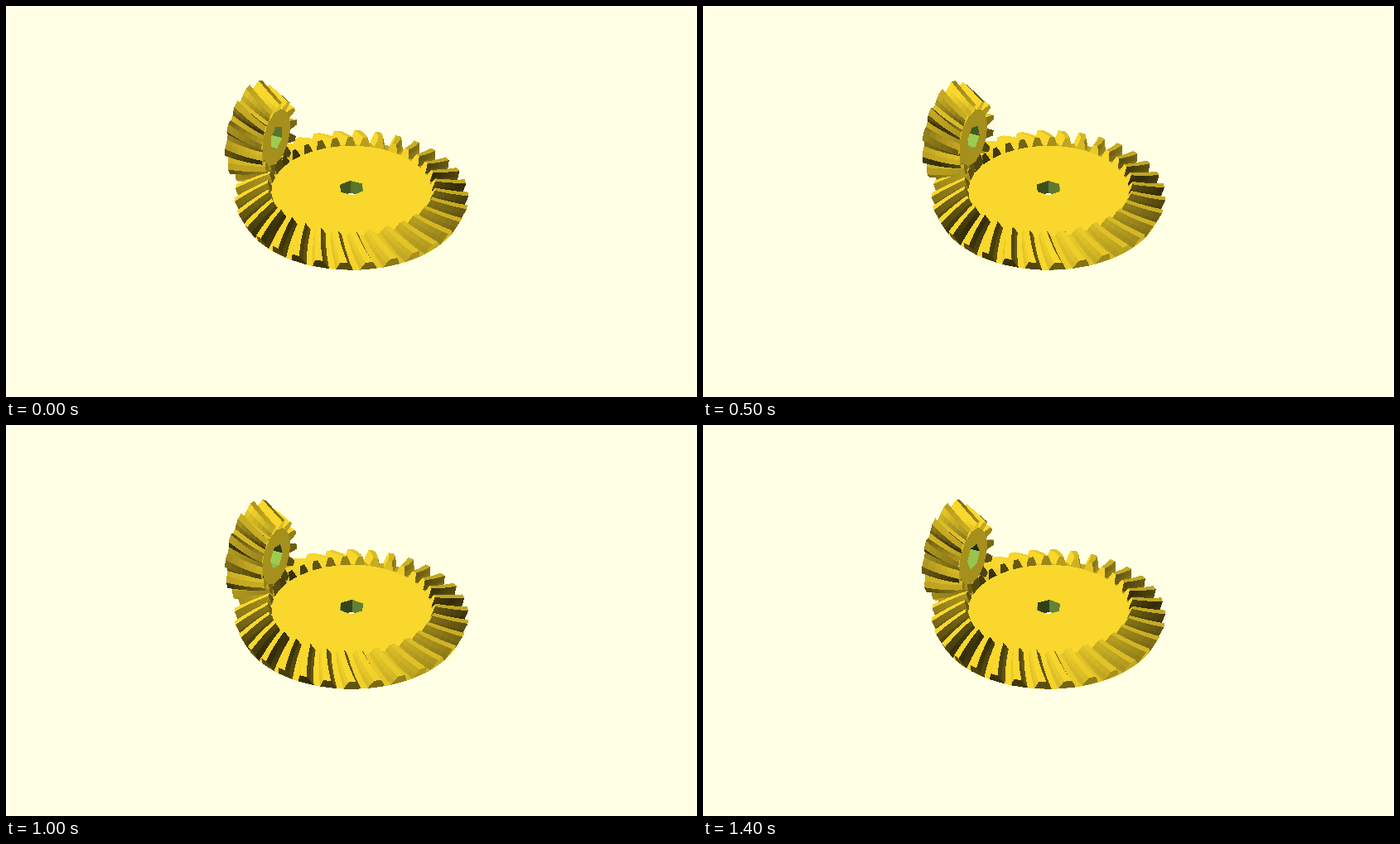
An HTML page with a canvas that plays this animation: 834x472 px, repeating every 1.5 s.

```html
<!DOCTYPE html>
<html lang="en">
<head>
<meta charset="utf-8">
<title>Bevel gears</title>
<style>
  html, body { margin: 0; width: 834px; height: 472px; overflow: hidden; background: #ffffe5; }
  canvas { display: block; }
</style>
</head>
<body>
<canvas id="stage" width="834" height="472"></canvas>
<script>
const W = 834, H = 472, LOOP = 1500, STEP = 100;
const ctx = document.getElementById('stage').getContext('2d');
const image = ctx.createImageData(W, H);
const pixels = new Uint32Array(image.data.buffer);
const zbuf = new Float32Array(W * H);

const RAD = Math.PI / 180, TAU = 2 * Math.PI;
const YELLOW = [249, 215, 44], GREEN = [157, 203, 81];
const BACKGROUND = 0xffe5ffff;

// Camera: 35 degrees above the ground, looking at the stage centre.
const CAM = H / 2 / Math.tan(11.25 * RAD);
const SIN = Math.sin(35 * RAD), COS = Math.cos(35 * RAD);

// Gear pair sharing one cone apex.
const PITCH_RADIUS = 136.6, ADDENDUM = 8, DEDENDUM = 7.5;
const INNER = 0.714, TWIST = 0.62, SLICES = 6, BORE = 15.5;
const APEX = [0, 0, 64.5];
const AZIMUTH = 25 * RAD;
const WHEEL = {
  teeth: 32, phase: 3.3 / 11.25, bore: -5 * RAD,
  axis: [0, 0, -1], u: [0, 1, 0], v: [1, 0, 0]
};
const PINION = {
  teeth: 13, phase: 2 * 13 / 360, bore: 0,
  axis: [-Math.cos(AZIMUTH), Math.sin(AZIMUTH), 0],
  u: [0, 0, 1], v: [-Math.sin(AZIMUTH), -Math.cos(AZIMUTH), 0]
};
WHEEL.cone = Math.atan2(WHEEL.teeth, PINION.teeth);
PINION.cone = Math.PI / 2 - WHEEL.cone;
const CONE_LENGTH = PITCH_RADIUS / Math.sin(WHEEL.cone);

// One tooth across: [offset in pitches, height from the pitch cone].
const PROFILE = [
  [-0.36, -DEDENDUM], [-0.265, 0.3], [-0.15, ADDENDUM],
  [0.15, ADDENDUM], [0.265, 0.3], [0.36, -DEDENDUM], [0.64, -DEDENDUM]
];

const sub = (a, b) => [a[0] - b[0], a[1] - b[1], a[2] - b[2]];
const dot = (a, b) => a[0] * b[0] + a[1] * b[1] + a[2] * b[2];
const cross = (a, b) => [
  a[1] * b[2] - a[2] * b[1], a[2] * b[0] - a[0] * b[2], a[0] * b[1] - a[1] * b[0]
];

const toEye = ([x, y, z]) => [x, y * SIN + z * COS, z * SIN - y * COS];

function project(p) {
  const k = CAM / (CAM - p[2]);
  return [W / 2 + p[0] * k, H / 2 - p[1] * k, k];
}

function shade(normal, color) {
  const [x, y, z] = normal, len = Math.hypot(x, y, z) * Math.sqrt(3);
  const light = (-x + y + z) / len;
  const k = Math.min(1, 0.2 + Math.abs(Math.max(0, light)) + Math.max(0, -light));
  const [r, g, b] = color.map(c => Math.round(c * k));
  return (255 << 24 | b << 16 | g << 8 | r) >>> 0;
}

function triangle(a, b, c, color) {
  const area = (b[0] - a[0]) * (c[1] - a[1]) - (b[1] - a[1]) * (c[0] - a[0]);
  if (Math.abs(area) < 1e-6) return;
  const x0 = Math.max(0, Math.ceil(Math.min(a[0], b[0], c[0]) - 0.5));
  const x1 = Math.min(W - 1, Math.floor(Math.max(a[0], b[0], c[0]) - 0.5));
  const y0 = Math.max(0, Math.ceil(Math.min(a[1], b[1], c[1]) - 0.5));
  const y1 = Math.min(H - 1, Math.floor(Math.max(a[1], b[1], c[1]) - 0.5));
  for (let y = y0; y <= y1; y++) {
    for (let x = x0; x <= x1; x++) {
      const px = x + 0.5, py = y + 0.5;
      const wb = ((px - a[0]) * (c[1] - a[1]) - (py - a[1]) * (c[0] - a[0])) / area;
      const wc = ((b[0] - a[0]) * (py - a[1]) - (b[1] - a[1]) * (px - a[0])) / area;
      if (wb < 0 || wc < 0 || wb + wc > 1) continue;
      const z = a[2] + wb * (b[2] - a[2]) + wc * (c[2] - a[2]);
      const i = y * W + x;
      if (z > zbuf[i]) {
        zbuf[i] = z;
        pixels[i] = color;
      }
    }
  }
}

// Flat shaded convex polygon, its normal turned to the viewer.
function polygon(points, color) {
  const m = points.length >> 1;
  let n = cross(sub(points[m], points[0]), sub(points[points.length - 1], points[m - 1]));
  if (dot(n, sub([0, 0, CAM], points[0])) < 0) n = n.map(c => -c);
  const fill = shade(n, color), s = points.map(project);
  for (let i = 2; i < s.length; i++) triangle(s[0], s[i - 1], s[i], fill);
}

function drawGear(gear, turn) {
  const { teeth, cone, axis, u, v } = gear;
  const pitch = TAU / teeth, sin = Math.sin(cone), cos = Math.cos(cone);
  const along = (e, s) => s * (CONE_LENGTH * cos - e * sin);
  const radius = (e, s) => s * (CONE_LENGTH * sin + e * cos);

  const at = (dist, r, angle) => {
    const cu = r * Math.cos(angle), cv = r * Math.sin(angle);
    return toEye(APEX.map((o, i) => o + axis[i] * dist + u[i] * cu + v[i] * cv));
  };

  for (let k = 0; k < teeth; k++) {
    const rows = [];
    for (let j = 0; j <= SLICES; j++) {
      const f = j / SLICES, s = 1 + (INNER - 1) * f;
      rows.push(PROFILE.map(([w, e]) =>
        at(along(e, s), radius(e, s), (k + gear.phase + turn + TWIST * f + w) * pitch)));
    }
    for (let j = 0; j < SLICES; j++) {
      for (let i = 0; i < PROFILE.length - 1; i++) {
        polygon([rows[j][i], rows[j][i + 1], rows[j + 1][i + 1], rows[j + 1][i]], YELLOW);
      }
    }
    polygon(rows[0].slice(0, 6), YELLOW);
    polygon(rows[SLICES].slice(0, 6), YELLOW);
  }

  // Caps with a hexagonal bore through them.
  const start = gear.bore + turn * pitch, parts = 96;
  const hex = a => BORE * Math.cos(30 * RAD) / Math.cos(a % (60 * RAD) - 30 * RAD);
  const ends = [1, INNER].map(s => [along(-DEDENDUM, s), radius(-DEDENDUM, s)]);
  for (const [dist, r] of ends) {
    for (let i = 0; i < parts; i++) {
      const a = i / parts * TAU, b = (i + 1) / parts * TAU;
      polygon([
        at(dist, hex(a), start + a), at(dist, r, start + a),
        at(dist, r, start + b), at(dist, hex(b), start + b)
      ], YELLOW);
    }
  }
  for (let i = 0; i < 6; i++) {
    const a = start + i * TAU / 6, b = a + TAU / 6;
    polygon([
      at(ends[0][0], BORE, a), at(ends[0][0], BORE, b),
      at(ends[1][0], BORE, b), at(ends[1][0], BORE, a)
    ], GREEN);
  }
}

function draw(step) {
  pixels.fill(BACKGROUND);
  zbuf.fill(0);
  const turn = step * STEP / LOOP;
  drawGear(WHEEL, turn);
  drawGear(PINION, turn);
  ctx.putImageData(image, 0, 0);
}

// Two opposite lights: upper left in front, lower right behind.
const began = performance.now();
let shown = -1;
function tick() {
  const step = Math.floor((performance.now() - began) % LOOP / STEP);
  if (step !== shown) draw(shown = step);
  requestAnimationFrame(tick);
}
tick();
</script>
</body>
</html>
```
